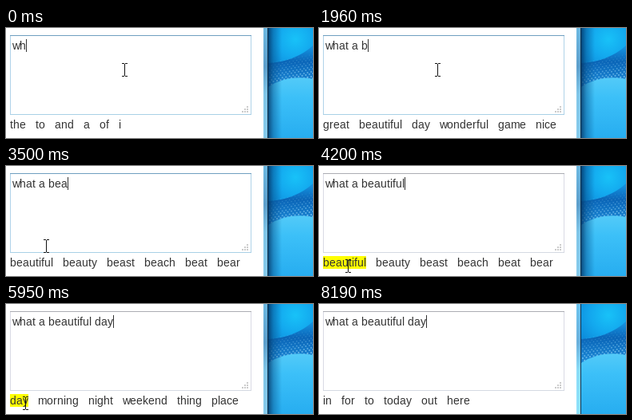
An HTML page with a canvas for the animation above (8260 ms loop, 384 px wide and 138 px high).

```html
<!DOCTYPE html>
<html lang="en">
<head>
<meta charset="utf-8">
<title>Word prediction</title>
<style>
html, body { margin: 0; width: 384px; height: 138px; overflow: hidden; background: #fff; }
canvas { display: block; }
</style>
</head>
<body>
<canvas id="stage" width="384" height="138"></canvas>
<script>
const c = document.getElementById('stage').getContext('2d');
const LOOP = 8260, TICK = 70, GAP = 12, INK = '#333';

// Each track lists [start in ms, value...]
const typed = [
  [0, 'wh'], [70, 'wha'], [560, 'what'], [980, 'what '], [1330, 'what a'],
  [1540, 'what a '], [1960, 'what a b'], [2240, 'what a be'], [2450, 'what a bea'],
  [4200, 'what a beautiful'], [5950, 'what a beautiful day']
];
const hints = [
  [0, 'the to and a of i'],
  [490, "what what's whatever whats whatsoever whatnot"],
  [1330, 'is the a i you are'],
  [1960, 'great beautiful day wonderful game nice'],
  [2800, 'beautiful beauty beast beach beat bear'],
  [4480, 'day morning night weekend thing place'],
  [6230, 'in for to today out here']
];
const caret = [
  [0, 1], [2870, 0], [3360, 1], [3850, 0], [4200, 1], [4690, 0], [5110, 1],
  [5600, 0], [5950, 1], [6440, 0], [6930, 1], [7420, 0], [7840, 1]
];
const shadow = [[0, 1], [8190, 0]];
const mouse = [
  [0, 148, 52], [3010, 148, 52], [3500, 50, 100], [3710, 36, 125], [4900, 36, 125],
  [4970, 42, 125], [5110, 44, 125], [5180, 44, 125], [5670, 24, 124],
  [6370, 24, 124], [6930, 36, 150], [LOOP, 36, 150]
];

const at = (track, t) => track.findLast(k => k[0] <= t)[1];

function mouseAt(t) {
  const i = mouse.findIndex(k => k[0] > t);
  const [t0, x0, y0] = mouse[i - 1], [t1, x1, y1] = mouse[i];
  const p = (t - t0) / (t1 - t0);
  return [Math.round(x0 + (x1 - x0) * p), Math.round(y0 + (y1 - y0) * p)];
}

function rect(color, x, y, w, h) {
  c.fillStyle = color;
  c.fillRect(x, y, w, h);
}

// Letters advance by whole pixels, as in hinted screen text
const narrowed = { w: 9, m: 11 };
const advance = ch => narrowed[ch] || Math.round(c.measureText(ch).width);
const width = s => [...s].reduce((sum, ch) => sum + advance(ch), 0);

function write(s, x, y) {
  c.fillStyle = INK;
  for (const ch of s) {
    c.fillText(ch, x, y);
    x += advance(ch);
  }
  return x;
}

function addStops(g, stops) {
  for (const [p, color] of stops) g.addColorStop(p, color);
  return g;
}
const linear = (x0, y0, x1, y1, ...stops) =>
  addStops(c.createLinearGradient(x0, y0, x1, y1), stops);
const radial = (x, y, r, ...stops) =>
  addStops(c.createRadialGradient(x, y, 0, x, y, r), stops);

// Fills everything below a curve
function below(fill, y0, x1, y1, y2) {
  c.beginPath();
  c.moveTo(328, y0);
  c.quadraticCurveTo(x1, y1, 384, y2);
  c.lineTo(384, 138);
  c.lineTo(328, 138);
  c.fillStyle = fill;
  c.fill();
}

function wallpaper(shaded) {
  rect(radial(362, 14, 50, [0, '#18c2f8'], [.45, '#13a8ee'], [1, '#0b82d4']), 328, 0, 56, 138);
  below(linear(0, 25, 0, 68, [0, '#1590dd'], [.4, '#0b66b8'], [1, '#1a84d2']), 44, 362, 42, 22);

  // Halftone wave
  for (let row = 0; row < 11; row++) {
    for (let col = 0; col < 13; col++) {
      c.fillStyle = `rgba(150,215,250,${.2 + row * .05})`;
      c.beginPath();
      c.arc(330 + col * 4.5 + row % 2 * 2.2, 44 + row * 3 - col * .9, .6 + row * .06, 0, 7);
      c.fill();
    }
  }
  below(linear(0, 60, 0, 138, [0, '#55cbf8'], [.35, '#3cc0f8'], [1, '#27adf0']), 74, 352, 58, 64);
  if (shaded)
    rect(linear(328, 0, 345, 0, [0, '#03305ecc'], [.4, '#05508a70'], [1, '#06508800']), 328, 0, 17, 138);

  // Glass window edge
  rect(shaded
    ? linear(0, 0, 0, 138, [0, '#6cb9e2'], [.35, '#5d9fcc'], [.6, '#80c6e8'], [1, '#86cbec'])
    : linear(0, 0, 0, 138, [0, '#6cc4ee'], [.35, '#6ab0dc'], [.6, '#8adcf8'], [1, '#8ee2fb']),
    322, 0, 5, 138);
  rect('#12324c', 327, 0, 1, 138);
}

function textBox(hot) {
  const [top, side, bottom] = hot ? ['#6f9fc0', '#b0d3e9', '#a9d0e6'] : ['#abadb3', '#d9dae4', '#d4d9e2'];
  rect(side, 5, 9, 1, 100);
  rect(side, 306, 9, 1, 100);
  rect(bottom, 5, 108, 302, 1);
  rect(top, 5, 9, 302, 1);
  for (let i = 0; i < 3; i++)
    for (let j = 0; j <= i; j++) rect('#cbcbcb', 301 - j * 3, 98 + i * 3, 2, 2);
}

function suggestions(words, mx, my) {
  let x = 5, y = 126;
  for (const word of words.split(' ')) {
    const w = width(word);
    if (x + w > 307) [x, y] = [5, y + 19];
    if (mx >= x && mx < x + w && my >= y - 13 && my < y + 3) rect('#ff0', x, y - 13, w, 16);
    x = write(word, x, y) + GAP;
  }
}

function pointer(x, y) {
  rect('#111', x, y - 7, 1, 15);
  for (const dy of [-8, 8]) {
    rect('#111', x - 3, y + dy, 3, 1);
    rect('#111', x + 1, y + dy, 3, 1);
  }
}

function draw(now) {
  const t = Math.floor(now % LOOP / TICK) * TICK;
  const [mx, my] = mouseAt(t);
  c.font = '14px "Liberation Sans", Arial, sans-serif';
  rect('#fff', 0, 0, 384, 138);
  wallpaper(at(shadow, t));
  textBox(my < 109);
  const end = write(at(typed, t), 8, 27);
  if (at(caret, t)) rect(INK, end, 14, 1, 16);
  suggestions(at(hints, t), mx, my);
  pointer(mx, my);
  requestAnimationFrame(draw);
}
draw(performance.now());
</script>
</body>
</html>
```
